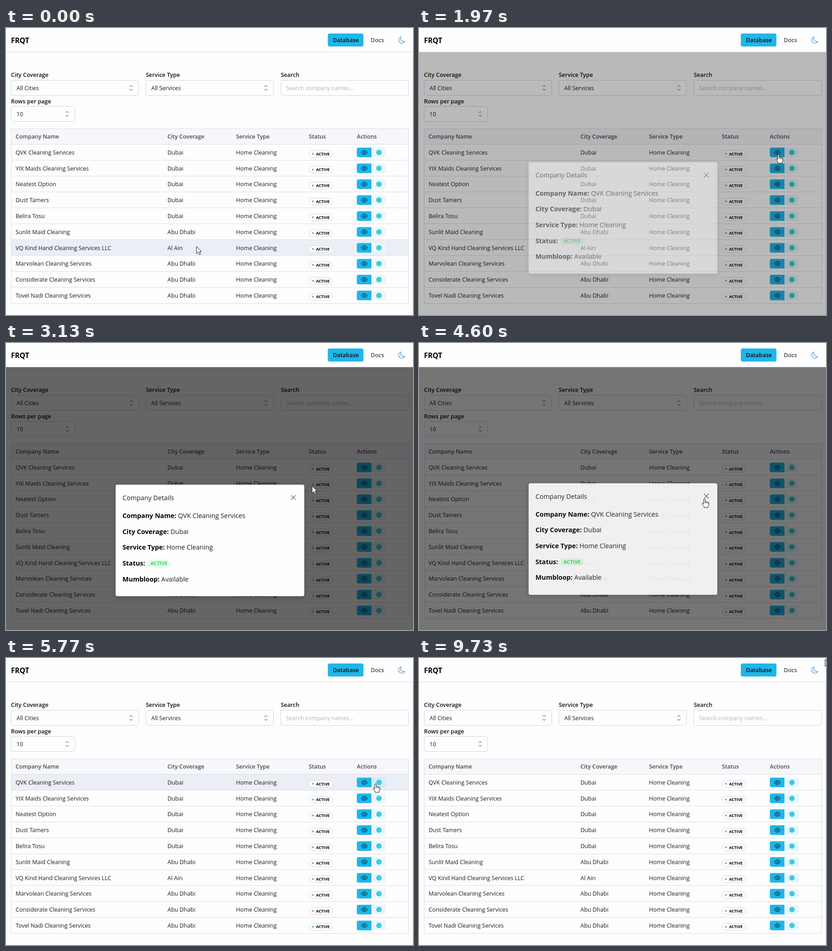
Animation, 891 px wide and 628 px high, one loop 9760 ms. Source, as an HTML page:

```html
<!DOCTYPE html>
<html lang="en">
<head>
<meta charset="utf-8">
<title>Company table</title>
<style>
  html, body { margin: 0; width: 100%; height: 100%; overflow: hidden; background: #fdfdfd; }
  svg { display: block; width: 100vw; height: 100vh; font: 12.5px "Open Sans", "Noto Sans", sans-serif; }
  text { white-space: pre; fill: #1c1c20; }
  .b { font-weight: 700; fill: #000; }
  .s { font-weight: 600; fill: #111; }
  .th { font-weight: 600; font-size: 12.3px; fill: #47474d; }
  .m { font-size: 14.3px; }
  .line { fill: none; stroke: #dbdce8; }
  .icon { fill: none; stroke-width: 1.2; stroke-linecap: round; stroke-linejoin: round; }
</style>
</head>
<body>
<svg id="stage" viewBox="0 0 891 628"></svg>
<script>
const LOOP = 9760, TOP = 254.5, STEP = 34.77;
const companies = [
  "QVK Cleaning Services", "YIX Maids Cleaning Services", "Neatest Option", "Dust Tamers",
  "Belira Tosu", "Sunlit Maid Cleaning", "VQ Kind Hand Cleaning Services LLC",
  "Marvolean Cleaning Services", "Considerate Cleaning Services", "Tovel Nadi Cleaning Services"
];
const cityOf = i => i < 5 ? "Dubai" : i === 6 ? "Al Ain" : "Abu Dhabi";

const text = (x, y, s, cls = "", extra = "") => `<text x="${x}" y="${y}" class="${cls}" ${extra}>${s}</text>`;
const rect = (x, y, w, h, r, extra) => `<rect x="${x}" y="${y}" width="${w}" height="${h}" rx="${r}" ${extra}/>`;
const icon = (d, color, extra = "") => `<path class="icon" d="${d}" stroke="${color}" ${extra}/>`;

const field = (x, y, w, value, isSelect = true) =>
  rect(x + .5, y + .5, w - 1, 33, 4, 'fill="#fefefe" stroke="#d0d2e4"') +
  text(x + 12, y + 21.5, value, "", isSelect ? "" : 'style="fill:#b2b4bc"') +
  (isSelect ? icon(`M${x + w - 20} ${y + 14.5}l3 -3 3 3m-6 5l3 3 3 -3`, "#8f9096") : "");

function row(name, i) {
  const y = TOP + i * STEP, c = y + 17.8;
  return rect(11, y, 871, STEP, 0, 'class="hover" fill="#ebeef5" visibility="hidden"') +
    `<path class="line" d="M11 ${y}H882"/>` +
    text(21, c + 4.6, name) + text(353.5, c + 4.6, cityOf(i)) + text(503.5, c + 4.6, "Home Cleaning") +
    rect(663.5, c - 4.5, 52, 15, 7.5, 'fill="#fefefe" stroke="#d6d8e4"') +
    `<circle cx="672" cy="${c + 2.8}" r="2.1" fill="#4cd964"/>` +
    text(678.7, c + 6.2, "ACTIVE", "b", 'font-size="8.7"') +
    `<path d="M800 ${c - 10.5}h-28q-4 0 -4 4v13q0 4 4 4h28z" fill="#1fb6ea"/>` +
    icon(`M778 ${c}q6.5 -9 13 0q-6.5 9 -13 0z`, "#08364a") +
    `<circle cx="784.5" cy="${c}" r="1.9" fill="none" stroke="#08364a" stroke-width="1.2"/>` +
    `<path class="chat" d="M800 ${c - 10.5}h27q4 0 4 4v13q0 4 -4 4h-27z" fill="#e8f7fc"/>` +
    `<circle cx="816.5" cy="${c}" r="6" fill="#45c8e2"/>`;
}

const detail = (y, label, value) =>
  `<text x="255" y="${y}" class="m"><tspan class="b">${label}:</tspan> ${value}</text>`;

const header =
  rect(0, 0, 891, 52, 0, 'fill="#fefefe"') + '<path class="line" d="M0 52.5H891"/>' +
  text(11, 32.5, "FRQT", "b", 'font-size="15.6"') +
  rect(704.5, 12, 78, 28.5, 4, 'fill="#1fb6ea"') + text(715.5, 31, "Database", "s") +
  text(798.5, 31, "Docs", "s", 'style="fill:#4a4a50"') +
  icon("M865 19.5A7 7 0 1 0 873 29A6.6 6.6 0 0 1 865 19.5z", "#3a8fd6");

const page =
  '<path class="line" d="M889.5 52V628" stroke-opacity=".5"/>' +
  text(11, 107, "City Coverage", "s") + field(11, 114, 280, "All Cities") +
  text(306, 107, "Service Type", "s") + field(306, 114, 280, "All Services") +
  text(601.5, 107, "Search", "s") + field(601, 114, 281, "Search company names...", false) +
  text(11, 164.5, "Rows per page", "s") + field(11, 171, 140, "10") +
  rect(11, 220, 871, 34.5, 0, 'fill="#f7f7fb"') +
  [[21, "Company Name"], [353.5, "City Coverage"], [503.5, "Service Type"], [663, "Status"], [768, "Actions"]]
    .map(([x, s]) => text(x, 242.3, s, "th")).join("") +
  companies.map(row).join("") +
  rect(11.5, 220.5, 870, 382, 0, 'class="line"');

const modal =
  rect(240, 310, 413, 244, 4, 'fill="#fefefe" style="filter:drop-shadow(0 3px 6px #0003)"') +
  text(255, 343.7, "Company Details", "m") +
  icon("M624.3 333.3l9.6 9.6m0 -9.6l-9.6 9.6", "#55555a") +
  detail(383, "Company Name", companies[0]) +
  detail(417.5, "City Coverage", "Dubai") +
  detail(452.3, "Service Type", "Home Cleaning") +
  detail(487, "Status", "") +
  rect(308, 474, 53, 17, 8.5, 'fill="#e9faed"') +
  text(316.3, 486.4, "ACTIVE", "b", 'font-size="10.9" style="fill:#40d35f"') +
  detail(521.5, "Mumbloop", "Available");

const cursors =
  '<g fill="#fff" stroke="#111" stroke-linejoin="round">' +
  '<path id="arrow" d="M0 0V15.5L3.7 12.1 6.3 18 9 16.8 6.4 11.1H11.2z"/>' +
  '<path id="hand" d="M-1.7 1.2Q0 -1 1.7 1.2V6.3Q3.6 5 4.7 7Q6.6 6 7.5 7.8Q9.7 7.2 9.8 9.6V13L7.8 16.5V19H-.9V17L-5 11.3Q-5.2 8.9 -3.2 9.6L-1.7 11.2z' +
  'M1.7 6.3V9.5M4.7 7V10M7.5 7.8V10.5"/></g>';

const stage = document.getElementById("stage");
stage.innerHTML = page + '<rect id="shade" y="52" width="891" height="576"/>' + header +
  `<g id="modal">${modal}</g>` + cursors;
const [shade, dialog, arrow, hand] = ["shade", "modal", "arrow", "hand"].map(id => document.getElementById(id));
const hovers = [...stage.querySelectorAll(".hover")], chats = [...stage.querySelectorAll(".chat")];

// Pointer stops: time, x, y
const path = [
  [0, 417, 478], [370, 417, 478], [1330, 785, 283], [1500, 785, 283], [1630, 787, 277],
  [2180, 787, 277], [2470, 762, 285], [2930, 762, 285], [3130, 670, 313], [3470, 634, 335],
  [3630, 634, 335], [3830, 627, 342], [3970, 627, 342], [4070, 625, 341],
  [5230, 625, 341], [5770, 809, 275], [7730, 809, 275], [8700, 742, 352],
  [8970, 742, 352], [9030, 744, 350], [9230, 744, 350], [9730, 889, 3], [LOOP, 889, 3]
];

function pointer(t) {
  const i = path.findIndex(p => p[0] > t);
  const [t0, x0, y0] = path[i - 1], [t1, x1, y1] = path[i];
  const k = (t - t0) / (t1 - t0), e = k * k * (3 - 2 * k);
  return [x0 + (x1 - x0) * e, y0 + (y1 - y0) * e];
}

// cubic-bezier(.25, .1, .25, 1)
function ease(x) {
  if (x <= 0 || x >= 1) return x <= 0 ? 0 : 1;
  let lo = 0, hi = 1, u;
  for (let i = 0; i < 20; i++) {
    u = (lo + hi) / 2;
    const v = 1 - u;
    if (.75 * u * v * v + .75 * u * u * v + u ** 3 < x) lo = u; else hi = u;
  }
  return .3 * u * (1 - u) ** 2 + 3 * u * u * (1 - u) + u ** 3;
}

const show = (el, on) => el.setAttribute("visibility", on ? "visible" : "hidden");

function draw(t) {
  const open = ease((t - 1917) / 200) - ease((t - 4580) / 200);
  shade.setAttribute("opacity", .6 * open);
  dialog.setAttribute("opacity", open);
  dialog.setAttribute("transform", `translate(0 ${-30 * (1 - open)})`);

  const [x, y] = pointer(t);
  const away = t >= 6200 && t < 7770;
  const index = Math.floor((y - TOP) / STEP);
  const active = open > 0 || away || x < 11 || x > 882 ? -1 : index;
  const offset = y - TOP - index * STEP;
  const onButton = index >= 0 && index < 10 && x > 768 && x < 831 && offset > 7 && offset < 29;
  const onClose = x > 618 && x < 640 && y > 327 && y < 349;
  const isHand = open > 0 ? onClose || t < 2180 : onButton;

  hovers.forEach((el, i) => show(el, i === active));
  chats.forEach((el, i) => el.setAttribute("fill", i === active && onButton && x > 800 ? "#d3ecfa" : "#e8f7fc"));
  for (const el of [arrow, hand]) {
    el.setAttribute("transform", `translate(${x} ${y})`);
    show(el, (el === hand) === isHand);
  }
}

const start = performance.now();
function tick() {
  draw((performance.now() - start) % LOOP);
  requestAnimationFrame(tick);
}
tick();
</script>
</body>
</html>
```
